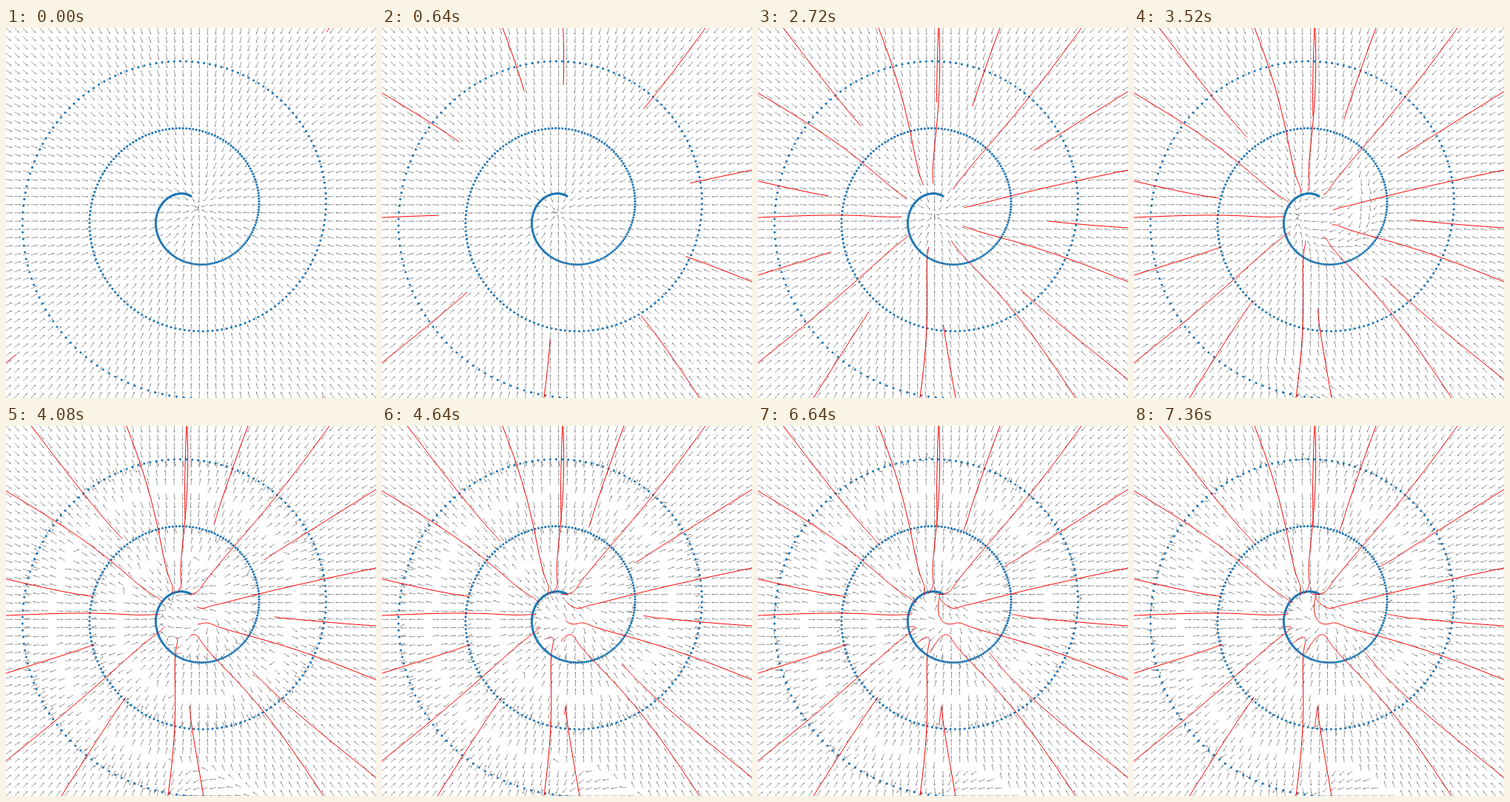
Recreate the animation shown at these times as an HTML page with a canvas. Size 500x500 px, loop 7.44 s.

```html
<!DOCTYPE html>
<html>
<head>
<meta charset="utf-8">
<style>
html, body { margin: 0; width: 100%; height: 100%; overflow: hidden; background: #fff; }
canvas { display: block; width: 500px; height: 500px; }
</style>
</head>
<body>
<canvas id="stage" width="500" height="500"></canvas>
<script>
const ctx = document.getElementById('stage').getContext('2d');
const SIZE = 500, HALF = SIZE / 2, UNIT = SIZE / 2.2;
const STEP_MS = 80, STEPS = 93;
const DECAY = 0.93; // noise ratio between steps
const COUNT = 400, GRID = 44;

// Swiss roll data
const roll = Array.from({ length: COUNT }, (_, i) => {
  const a = Math.PI / 2 + 5 * Math.PI * i / (COUNT - 1);
  const r = a / (5 * Math.PI) * UNIT;
  return [HALF + r * Math.cos(a), HALF - r * Math.sin(a)];
});

const noise = step => 260 * DECAY ** (step - 18);

// The field's centre wobbles while the noise is high
function drift(step) {
  const swing = Math.cos(step * Math.PI / 20) * Math.min(1, noise(step) / 80);
  return [27 * swing * Math.exp(-step / 12), -9 * swing * Math.exp(-step / 40)];
}

// Expected clean point for a noisy point: a Gaussian-weighted mean of the data
const dist2 = new Float64Array(COUNT);
function denoise([px, py], step) {
  const sigma = noise(step);
  const [ox, oy] = drift(step);
  const x = px - ox, y = py - oy;
  let min = Infinity;
  for (let i = 0; i < COUNT; i++) {
    const dx = roll[i][0] - x, dy = roll[i][1] - y;
    dist2[i] = dx * dx + dy * dy;
    if (dist2[i] < min) min = dist2[i];
  }
  let sum = 0, sx = 0, sy = 0;
  for (let i = 0; i < COUNT; i++) {
    const e = (dist2[i] - min) / (2 * sigma * sigma);
    if (e > 20) continue;
    const w = Math.exp(-e);
    sum += w;
    sx += w * roll[i][0];
    sy += w * roll[i][1];
  }
  return [sx / sum + ox, sy / sum + oy];
}

// Follow a sample from where it enters the stage, at the given angle
function trace(degrees, startRadius) {
  const a = degrees * Math.PI / 180, c = Math.cos(a), s = Math.sin(a);
  const edge = HALF / Math.max(Math.abs(c), Math.abs(s));
  const start = Math.log(edge / startRadius) / Math.log(DECAY) - 1;
  let p = [HALF + edge * c, HALF + edge * s];
  const points = [p];
  const first = Math.max(0, Math.ceil(start));
  for (let step = first, last = start; step < STEPS; last = step++) {
    const goal = denoise(p, Math.max(0, last));
    const keep = DECAY ** (step - last);
    p = p.map((v, i) => goal[i] + (v - goal[i]) * keep);
    points.push(p);
  }
  return { first, points };
}

const nearAngles = [-147, -109.2, -91.2, -53.2, -13.1, 20.4, 54.4, 97.1, 141, 178.6];
const farAngles = [-170.2, -130.8, -91.4, -72.9, -33.3, 4.6, 42, 86.1, 125, 161.4];
const paths = [
  ...nearAngles.map(a => trace(a, 328)),
  ...farAngles.map(a => trace(a, 1290))
];

function drawField(step) {
  const gap = SIZE / GRID, len = 9.5, head = 2.8, half = 0.9;
  const shafts = new Path2D(), heads = new Path2D();
  for (let row = 0; row <= GRID; row++) {
    for (let col = 0; col <= GRID; col++) {
      const x = col * gap, y = row * gap;
      const [gx, gy] = denoise([x, y], step);
      const a = Math.atan2(gy - y, gx - x);
      const c = Math.cos(a), s = Math.sin(a);
      const bx = x + c * (len - head), by = y + s * (len - head);
      shafts.moveTo(x, y);
      shafts.lineTo(bx, by);
      heads.moveTo(x + c * len, y + s * len);
      heads.lineTo(bx - s * half, by + c * half);
      heads.lineTo(bx + s * half, by - c * half);
      heads.closePath();
    }
  }
  ctx.strokeStyle = ctx.fillStyle = '#6c6c6c';
  ctx.lineWidth = 0.65;
  ctx.stroke(shafts);
  ctx.fill(heads);
}

function drawRoll() {
  ctx.fillStyle = '#1f77b4';
  for (const [x, y] of roll) {
    ctx.beginPath();
    ctx.arc(x, y, 1.6, 0, 2 * Math.PI);
    ctx.fill();
  }
}

function drawPaths(step) {
  ctx.strokeStyle = '#f00';
  ctx.lineWidth = 1;
  ctx.lineJoin = 'round';
  ctx.beginPath();
  for (const { first, points } of paths) {
    if (step < first) continue;
    points.slice(0, step - first + 2).forEach((p, i) => i ? ctx.lineTo(...p) : ctx.moveTo(...p));
  }
  ctx.stroke();
}

let shown = -1;
function tick() {
  const step = Math.floor(performance.now() / STEP_MS) % STEPS;
  if (step !== shown) {
    shown = step;
    ctx.fillStyle = '#fff';
    ctx.fillRect(0, 0, SIZE, SIZE);
    drawField(step);
    drawRoll();
    drawPaths(step);
  }
  requestAnimationFrame(tick);
}
tick();
</script>
</body>
</html>
```
